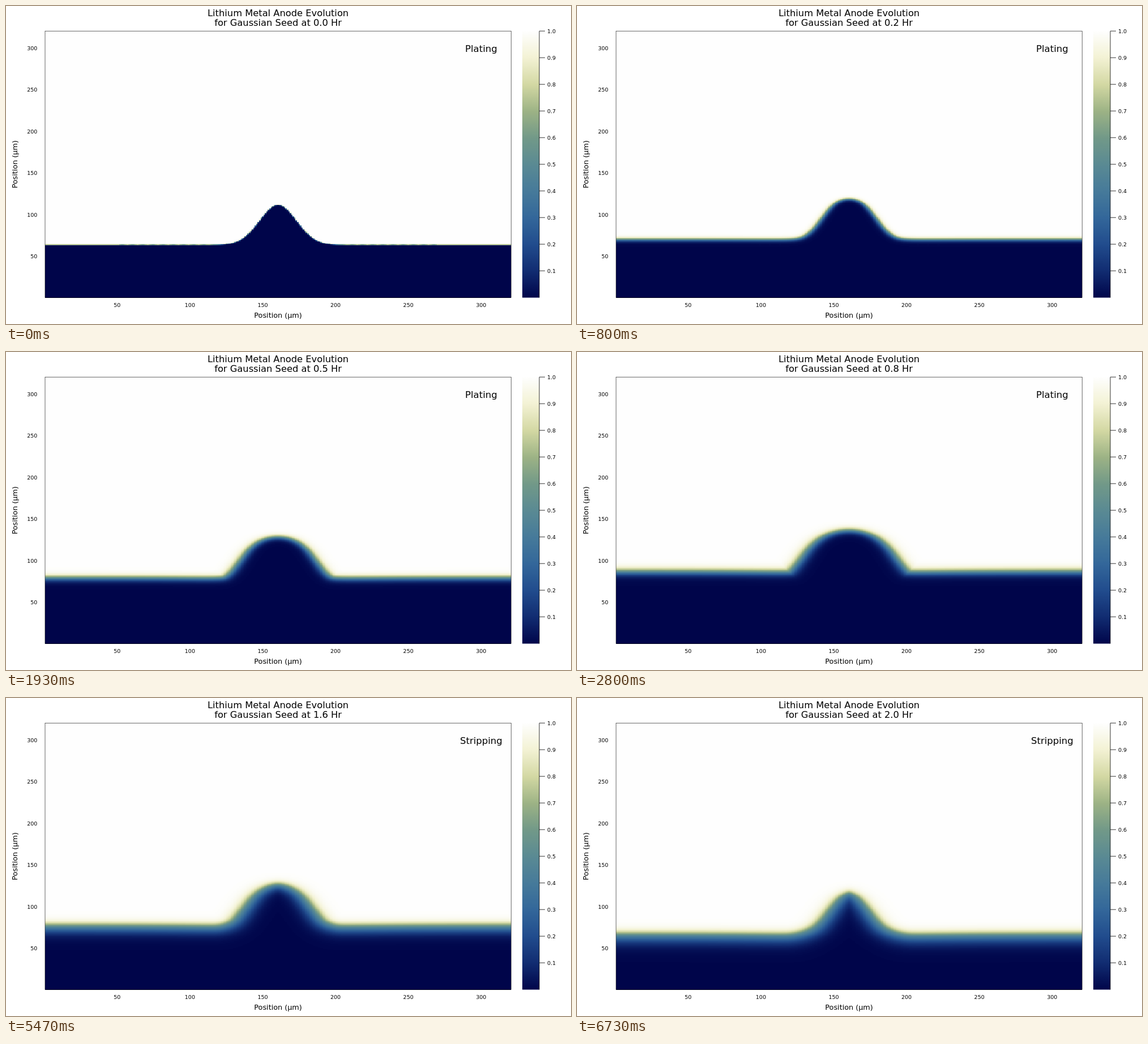
Write an HTML page with a canvas that moves like this. It is 998x561 px and loops after 6790 ms.

```html
<!DOCTYPE html>
<html>
<head>
<meta charset="utf-8">
<style>
  html, body { margin: 0; width: 100%; height: 100%; overflow: hidden; background: #fff; }
  canvas, svg { position: absolute; left: 0; top: 0; }
  text { font-family: "DejaVu Sans", sans-serif; text-anchor: middle; }
</style>
</head>
<body>
<canvas id="stage" width="998" height="561"></canvas>
<svg id="labels" width="998" height="561">
  <rect x="69" y="44.2" width="823.2" height="470.3" fill="none" stroke="#000" stroke-width="0.6"/>
</svg>
<script>
const N = 320, MID = 160.5, LOW = 15, HIGH = 195;
const BOX = { x: 69, y: 44.3, w: 823, h: 470.2 };
const STEP = 1000 / 15, LOOP = 6790, LAST = 101, TURN = 51;
const ctx = document.getElementById('stage').getContext('2d');
const svg = document.getElementById('labels');

// Piecewise linear interpolation through [position, value] pairs
function keyed(keys, p) {
  let i = 1;
  while (i < keys.length - 1 && keys[i][0] < p) i++;
  const [a, u] = keys[i - 1], [b, v] = keys[i];
  return u + (v - u) * (p - a) / (b - a);
}

const FRONT = [[0, -.25], [12, 6.4], [29, 15.3], [42, 23], [TURN, 28], [63, 22.8], [82, 12.3], [101, 2]];
const UPPER = [[0, .5], [4, 1.4], [12, 2.7], [29, 4.6], [42, 5.5], [63, 6.1], [82, 6.6], [101, 6.8]];
const LOWER = [[0, .5], [4, 1.5], [12, 3], [29, 4.8], [42, 6], [63, 8], [82, 10], [101, 11.6]];
const REACH = keyed(FRONT, TURN);

// Colour scale from deep blue to white
const STOPS = [
  [0, 5, 74], [17, 44, 113], [33, 76, 141], [51, 103, 154], [70, 122, 154], [90, 138, 147],
  [114, 153, 136], [157, 179, 133], [211, 216, 163], [243, 242, 212], [254, 254, 254]
];
const palette = Array.from({ length: 256 }, (_, i) =>
  [0, 1, 2].map(c => keyed(STOPS.map((s, j) => [j / 10, s[c]]), i / 255)));
const packed = Uint32Array.from(palette, ([r, g, b]) =>
  (255 << 24 | Math.round(b) << 16 | Math.round(g) << 8 | Math.round(r)) >>> 0);

// Signed distance to a symmetric height curve, for the left half of the grid
function distances(height) {
  const px = [], py = [];
  for (let t = -40; t < 200; t += .35) {
    px.push(t);
    py.push(height(Math.abs(t)));
  }
  const field = [];
  for (let x = 0; x < N / 2; x++) {
    const dx = x + .5, top = height(dx);
    field.push(new Float32Array(HIGH));
    for (let y = LOW; y < HIGH; y++) {
      let best = 1e9;
      for (let i = 0; i < px.length; i++) {
        const a = px[i] - dx, b = py[i] - y, d = a * a + b * b;
        if (d < best) best = d;
      }
      field[x][y] = Math.sign(y - top) * Math.sqrt(best);
    }
  }
  return field;
}

const bell = (dx, width) => Math.exp(-((dx / width) ** 2));
// The tip grows slightly faster, the foot slightly slower
const growth = dx => 1 + .1 * bell(dx, 20) - .04 * bell(dx, 70);

const seed = distances(dx => 64 + 48 * Math.exp(-dx * dx / (2 * 12.8 ** 2)));
const crest = seed.map((col, x) => {
  const goal = REACH * growth(x + .5);
  let y = HIGH - 1;
  while (y > LOW + 1 && col[y - 1] > goal) y--;
  return y - (col[y] - goal) / (col[y] - col[y - 1]);
});
const grown = distances(dx => {
  const p = Math.min(Math.max(dx - .5, 0), N / 2 - 1.001), i = Math.floor(p);
  return crest[i] + (crest[i + 1] - crest[i]) * (p - i);
});

const grid = document.createElement('canvas');
grid.width = grid.height = N;
const gridCtx = grid.getContext('2d');
const image = gridCtx.createImageData(N, N);
const cells = new Uint32Array(image.data.buffer);
cells.fill(packed[255]);
cells.fill(packed[0], (N - LOW) * N);

function drawField(k) {
  const front = keyed(FRONT, k), up = keyed(UPPER, k), down = keyed(LOWER, k);
  const mix = Math.min(Math.max((k - TURN) / 8, 0), 1);
  for (let x = 0; x < N / 2; x++) {
    const dx = x + .5, shift = front * growth(dx), narrow = 1 - .2 * bell(dx, 20);
    for (let y = LOW; y < HIGH; y++) {
      const a = seed[x][y] - shift, b = grown[x][y] + REACH - front;
      const q = a + (b - a) * mix;
      const z = q / ((q > 0 ? up : down) * narrow);
      const color = packed[Math.round(127.5 * (1 + Math.tanh(1.0986 * z)))];
      const row = (N - y) * N + N / 2;
      cells[row + x] = cells[row - 1 - x] = color;
    }
  }
  gridCtx.putImageData(image, 0, 0);
  ctx.imageSmoothingEnabled = false;
  ctx.drawImage(grid, BOX.x, BOX.y, BOX.w, BOX.h);
}

function add(tag, attrs, content = '') {
  const el = document.createElementNS('http://www.w3.org/2000/svg', tag);
  for (const name in attrs) el.setAttribute(name, attrs[name]);
  el.textContent = content;
  svg.append(el);
  return el;
}
const label = (x, y, size, content, style = '') =>
  add('text', { x, y, 'font-size': size, style }, content);
const line = (x1, y1, x2, y2) =>
  add('line', { x1, y1, x2, y2, stroke: '#000', 'stroke-width': .8 });

label(480.6, 17.6, 16.3, 'Lithium Metal Anode Evolution');
const clock = label(480.6, 35, 16.3, '');
const phase = label(839.4, 80.6, 16.5, '');
label(480.6, 550.3, 12.8, 'Position (µm)');
label(0, 0, 12.8, 'Position (µm)').setAttribute('transform', 'translate(20 279.3) rotate(-90)');
for (let v = 50; v <= 300; v += 50) {
  label(BOX.x + (v - .5) * BOX.w / N, 531, 9.5, v);
  label(55.4, BOX.y + BOX.h - (v - .5) * BOX.h / N + 3.6, 9.5, v, 'text-anchor:end');
}

const scale = ctx.createLinearGradient(0, 514.5, 0, 44.3);
palette.forEach((c, i) => scale.addColorStop(i / 255, `rgb(${c.map(Math.round)})`));
ctx.fillStyle = scale;
ctx.fillRect(912, 44.3, 30, 470.2);
line(942, 44.3, 942, 514.5);
for (let i = 1; i <= 10; i++) {
  const y = 514.2 - 47 * i;
  line(942, y, 952, y);
  label(956, y + 3.6, 9.5, (i / 10).toFixed(1), 'text-anchor:start');
}

let shown = -1;
function tick() {
  const k = Math.min(LAST, Math.floor((performance.now() % LOOP + 4) / STEP));
  if (k !== shown) {
    shown = k;
    drawField(k);
    const hours = Math.floor(20 * k / LAST) / 10;
    clock.textContent = `for Gaussian Seed at ${hours.toFixed(1)} Hr`;
    phase.textContent = k < TURN ? 'Plating' : 'Stripping';
  }
  requestAnimationFrame(tick);
}
tick();
</script>
</body>
</html>
```
